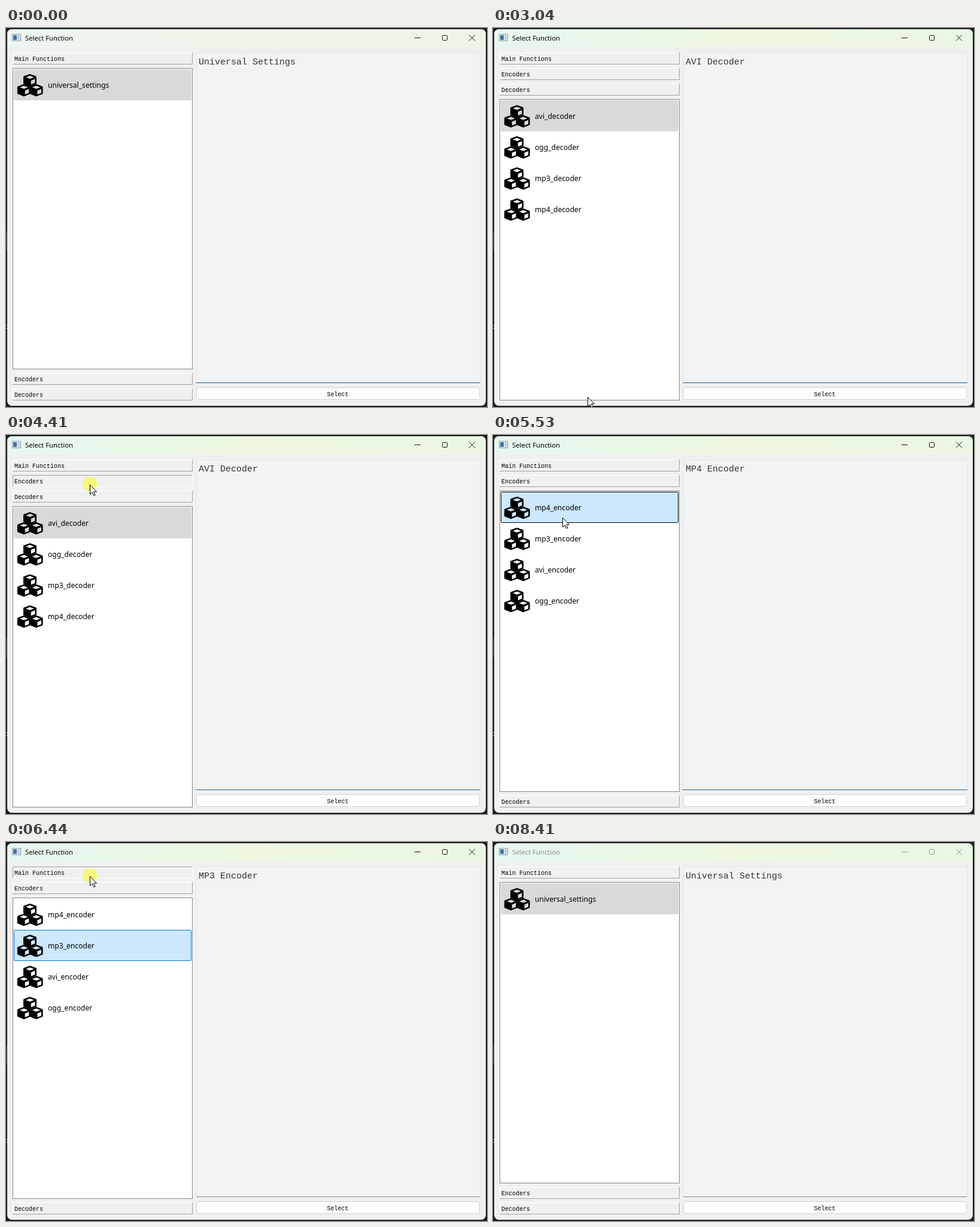
An HTML page that plays this animation: 804 by 634 pixels, repeating every 8480 ms.

```html
<!DOCTYPE html>
<html lang="en">
<head>
<meta charset="utf-8">
<title>Select Function</title>
<style>
  html, body { margin: 0; width: 100%; height: 100%; overflow: hidden; background: #1c1c1e; }
  svg { display: block; width: 804px; height: 634px; }
  text { white-space: pre; }
  .mono { font: 10px "Liberation Mono", monospace; fill: #000; }
  .doc { font: 15px "Liberation Mono", monospace; fill: #333; }
  .item { font: 12.1px "Noto Sans", sans-serif; fill: #000; }
  .title { font: 11.25px "Noto Sans", sans-serif; }
  .crisp { shape-rendering: crispEdges; }
</style>
</head>
<body>
<svg id="stage" viewBox="0 0 804 634">
  <defs>
    <linearGradient id="bar0">
      <stop offset="0" stop-color="#ecf5f1"/><stop offset=".5" stop-color="#eff5e8"/><stop offset="1" stop-color="#edf5e8"/>
    </linearGradient>
    <linearGradient id="bar1">
      <stop offset="0" stop-color="#e6f7f0"/><stop offset=".5" stop-color="#eef8e1"/><stop offset="1" stop-color="#eaf6e4"/>
    </linearGradient>
    <clipPath id="frame"><rect x="2" y="2" width="800" height="630" rx="8"/></clipPath>
    <g id="cube">
      <path fill-rule="evenodd" d="M0-10.2L10-6.6Q11-6.2 11-5V5Q11 6.2 10 6.6L0 10.5L-10 6.6Q-11 6.2-11 5V-5Q-11-6.2-10-6.6Z
        M0-7.4L-6.8-4.8L0-2.2L6.8-4.8Z M1.8 .7V7.2L8.4 4.6V-1.9Z"/>
    </g>
    <g id="cubes">
      <use href="#cube" x="21" y="10.2"/><use href="#cube" x="10.9" y="27"/><use href="#cube" x="31.6" y="27"/>
    </g>
  </defs>
</svg>
<script>
const LOOP = 8480, TICK = LOOP / 126;
const stage = document.getElementById('stage');

function add(parent, tag, attrs, text) {
  const el = document.createElementNS('http://www.w3.org/2000/svg', tag);
  set(el, attrs);
  if (text) el.textContent = text;
  parent.append(el);
  return el;
}
function set(el, attrs) {
  for (const k in attrs) el.setAttribute(k, attrs[k]);
}
const rect = (parent, x, y, width, height, fill, more) =>
  add(parent, 'rect', { x, y, width, height, fill, ...more });
const label = (parent, x, y, cls, text, more) =>
  add(parent, 'text', { x, y, class: cls, ...more }, text);
const crisp = { class: 'crisp' };

const HEADERS = ['Main Functions', 'Encoders', 'Decoders'];
const PAGES = [
  [['universal_settings', 'Universal Settings']],
  [['mp4_encoder', 'MP4 Encoder'], ['mp3_encoder', 'MP3 Encoder'],
   ['avi_encoder', 'AVI Encoder'], ['ogg_encoder', 'OGG Encoder']],
  [['avi_decoder', 'AVI Decoder'], ['ogg_decoder', 'OGG Decoder'],
   ['mp3_decoder', 'MP3 Decoder'], ['mp4_decoder', 'MP4 Decoder']]
];

// Window and title bar
rect(stage, 0, 0, 804, 634, '#1c1c1e');
rect(stage, 0, 340, 2, 32, '#39393b');
rect(stage, 0, 497, 2, 1, '#aaa');
rect(stage, 0, 502, 2, 1, '#aaa');
const win = add(stage, 'g', { 'clip-path': 'url(#frame)' });
rect(win, 2, 2, 800, 630, '#f0f0f0');
const bar = rect(win, 2, 2, 800, 30, '#f3f3f3');
rect(win, 10.5, 10.5, 14, 11, '#f4f7fa', { stroke: '#8a939c' });
rect(win, 12, 12, 6, 8, '#3d74a5');
rect(win, 19, 12, 4, 8, '#c3ccd4');
const caption = label(win, 32, 21, 'title', 'Select Function');
const controls = add(win, 'path', {
  d: 'M683 16.5H693 M730.5 12.5H736.5Q737.5 12.5 737.5 13.5V19.5Q737.5 20.5 736.5 20.5H730.5Q729.5 20.5 729.5 19.5V13.5Q729.5 12.5 730.5 12.5Z M774 11.5L784 21.5M784 11.5L774 21.5',
  fill: 'none'
});

// Text panel and button
rect(win, 318, 41, 475, 553, '#e4e6e8', crisp);
rect(win, 319, 42, 473, 551, '#f1f3f5', crisp);
const line = rect(win, 318, 593, 474, 1, '#868686', crisp);
const doc = label(win, 322, 61, 'doc', ' ');
const button = rect(win, 318.5, 601.5, 473, 20, '#fdfdfd', { rx: 3.5 });
label(win, 554.5, 616, 'mono', 'Select', { 'text-anchor': 'middle' });

// Accordion headers
const headers = HEADERS.map(name => {
  const g = add(win, 'g', {});
  rect(g, 11, 0, 301, 20, '#f0f0f0', crisp);
  const light = add(g, 'path', { d: 'M11 .5H311 M11.5 0V19', ...crisp });
  const dark = add(g, 'path', { d: 'M11 19.5H312 M311.5 0V20', ...crisp });
  label(g, 14, 14, 'mono', name);
  return { g, light, dark };
});

// One list per page
const lists = PAGES.map((items, p) => {
  const g = add(win, 'g', { transform: `translate(11 ${67 + 26 * p})` });
  rect(g, .5, .5, 300, 503, '#fff', { stroke: '#828790', ...crisp });
  const rows = items.map(([name], i) => {
    const row = add(g, 'g', { transform: `translate(2 ${2 + 52 * i})` });
    const back = rect(row, .5, .5, 296, 51, 'none', { rx: 1 });
    add(row, 'use', { href: '#cubes', x: 6, y: 8 });
    label(row, 57, 31, 'item', name);
    return back;
  });
  return { g, rows };
});

const halo = add(stage, 'circle', { r: 12, fill: '#ff0', opacity: .5 });
const arrow = add(stage, 'path', {
  d: 'M.5 .5V16.3L4.2 12.8L6.7 18.4L9 17.4L6.6 11.9H11.4Z',
  fill: '#fff', stroke: '#000', 'stroke-linejoin': 'round'
});

// Each step changes only what it names; press: 0-2 headers, 3 list row, 4 button
const STEPS = [
  [0, { page: 0, sel: 0, active: true, press: -1, list: false, bar: 'url(#bar0)' }],
  [70, { bar: 'url(#bar1)' }],
  [260, { active: false, bar: '#f3f3f3' }],
  [1900, { active: true, press: 1, bar: 'url(#bar1)' }],
  [2100, { page: 1, press: -1 }],
  [2900, { press: 2 }],
  [3040, { page: 2, press: -1 }],
  [4410, { press: 1 }],
  [4610, { page: 1, press: -1 }],
  [5670, { press: 3, sel: 1, list: true }],
  [5740, { press: -1 }],
  [6440, { press: 0 }],
  [6570, { page: 0, sel: 0, list: false, press: -1 }],
  [8010, { press: 4 }],
  [8140, { press: -1 }],
  [8410, { active: false }]
];

// Pointer path: time, x, y
const PATH = [
  [560, -14, 380], [1090, 152, 544], [1430, 158, 588], [1560, 158, 591],
  [2300, 158, 591], [2560, 158, 617], [3040, 158, 617], [3850, 140, 102],
  [3900, 140, 102], [4280, 140, 83], [4800, 140, 83], [5240, 140, 53],
  [5390, 140, 53], [5515, 116, 138], [5650, 118, 166], [5830, 118, 166],
  [6370, 140, 57], [6560, 140, 57], [6690, 140, 72], [7150, 140, 87],
  [7380, 140, 87], [7930, 420, 616]
];

function pointer(t) {
  t = Math.floor((t + 10) / TICK) * TICK;
  const i = PATH.findIndex(k => k[0] > t);
  if (i === 0) return PATH[0].slice(1);
  if (i < 0) return PATH[PATH.length - 1].slice(1);
  const [t0, x0, y0] = PATH[i - 1], [t1, x1, y1] = PATH[i];
  const u = (t - t0) / (t1 - t0), e = u * u * (3 - 2 * u);
  return [Math.round(x0 + (x1 - x0) * e), Math.round(y0 + (y1 - y0) * e)];
}

function rowStyle(selected, hover, s) {
  if (selected && s.list && s.active) return ['#cce8ff', '#0078d7'];
  if (selected && hover) return ['#cce8ff', '#000'];
  if (selected) return ['#d9d9d9', '#d9d9d9'];
  return hover ? ['#e5f3ff', '#e5f3ff'] : ['none', 'none'];
}

function render(t) {
  const s = {};
  for (const [at, change] of STEPS) if (t >= at) Object.assign(s, change);
  const [x, y] = pointer(t);

  set(bar, { fill: s.bar });
  set(caption, { fill: s.active ? '#000' : '#8f8f8f' });
  set(controls, { stroke: s.active ? '#111' : '#929292' });
  doc.textContent = PAGES[s.page][s.sel][1];

  const focus = s.active && !s.list;
  set(line, focus ? { x: 317, width: 476, fill: '#1f5f96' } : { x: 318, width: 474, fill: '#868686' });
  const over = s.active && x > 318 && x < 792 && y > 601 && y < 622;
  set(button, {
    fill: s.press === 4 ? '#cce4f7' : over ? '#e0eef9' : '#fdfdfd',
    stroke: over ? '#0078d4' : '#d2d2d2'
  });

  headers.forEach(({ g, light, dark }, i) => {
    const down = s.press === i;
    set(g, { transform: `translate(0 ${i <= s.page ? 41 + 26 * i : 551 + 26 * i})` });
    set(light, { stroke: down ? '#a0a0a0' : '#fff' });
    set(dark, { stroke: down ? '#fff' : '#a0a0a0' });
  });

  lists.forEach(({ g, rows }, p) => {
    set(g, { display: p === s.page ? 'inline' : 'none' });
    if (p !== s.page) return;
    const top = 69 + 26 * p;
    rows.forEach((row, i) => {
      const hover = s.active && x > 13 && x < 310 && Math.floor((y - top) / 52) === i;
      const [fill, stroke] = rowStyle(i === s.sel, hover, s);
      set(row, { fill, stroke });
    });
  });

  set(halo, { cx: x, cy: y - 1, display: s.press < 0 ? 'none' : 'inline' });
  set(arrow, { transform: `translate(${x} ${y})`, display: t < 560 || t >= 8410 ? 'none' : 'inline' });
}

const start = performance.now();
function loop() {
  render((performance.now() - start) % LOOP);
  requestAnimationFrame(loop);
}
loop();
</script>
</body>
</html>
```
